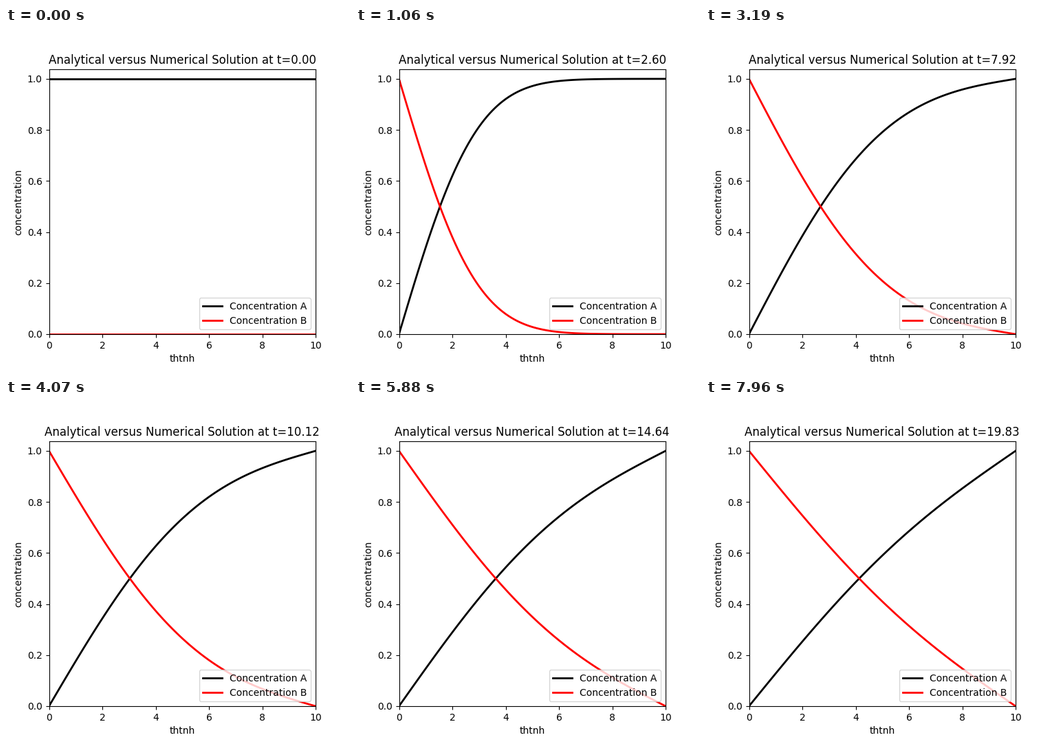
Write a matplotlib script that moves like this. It is 500 by 500 pixels and loops after 7990 ms.

```python
import numpy as np
import matplotlib.pyplot as plt
from matplotlib.animation import FuncAnimation

LENGTH = 10.0
STEPS = 300
LOOP_MS = 7990
END_TIME = 19.9

x = np.linspace(0, LENGTH, 101)
modes = np.arange(1, 150)[:, None] * np.pi
shapes = 2 / modes * np.sin(modes * x / LENGTH)


def conc_b(t):
    """Diffusion from a wall held at 1 towards a wall held at 0."""
    if t == 0:
        return np.zeros_like(x)
    decay = np.exp(-(modes / LENGTH) ** 2 * t)
    return 1 - x / LENGTH - (shapes * decay).sum(axis=0)


fig, ax = plt.subplots(figsize=(5, 5), dpi=100)
line_a, = ax.plot(x, np.ones_like(x), color="black", lw=2, label="Concentration A")
line_b, = ax.plot(x, np.zeros_like(x), color="red", lw=2, label="Concentration B")
ax.set_xlim(0, LENGTH)
ax.set_ylim(0, 1.0375)
ax.set_xlabel("thtnh")
ax.set_ylabel("concentration")
ax.legend(loc="lower right")
title = ax.set_title("")


def draw(step):
    t = END_TIME * step / (STEPS - 1)
    b = conc_b(t)
    line_a.set_ydata(1 - b)
    line_b.set_ydata(b)
    title.set_text(f"Analytical versus Numerical Solution at t={t:.2f}")
    return line_a, line_b, title


anim = FuncAnimation(fig, draw, frames=STEPS, interval=LOOP_MS / STEPS,
                     init_func=lambda: draw(0), repeat=True, repeat_delay=0)
plt.show()
```
